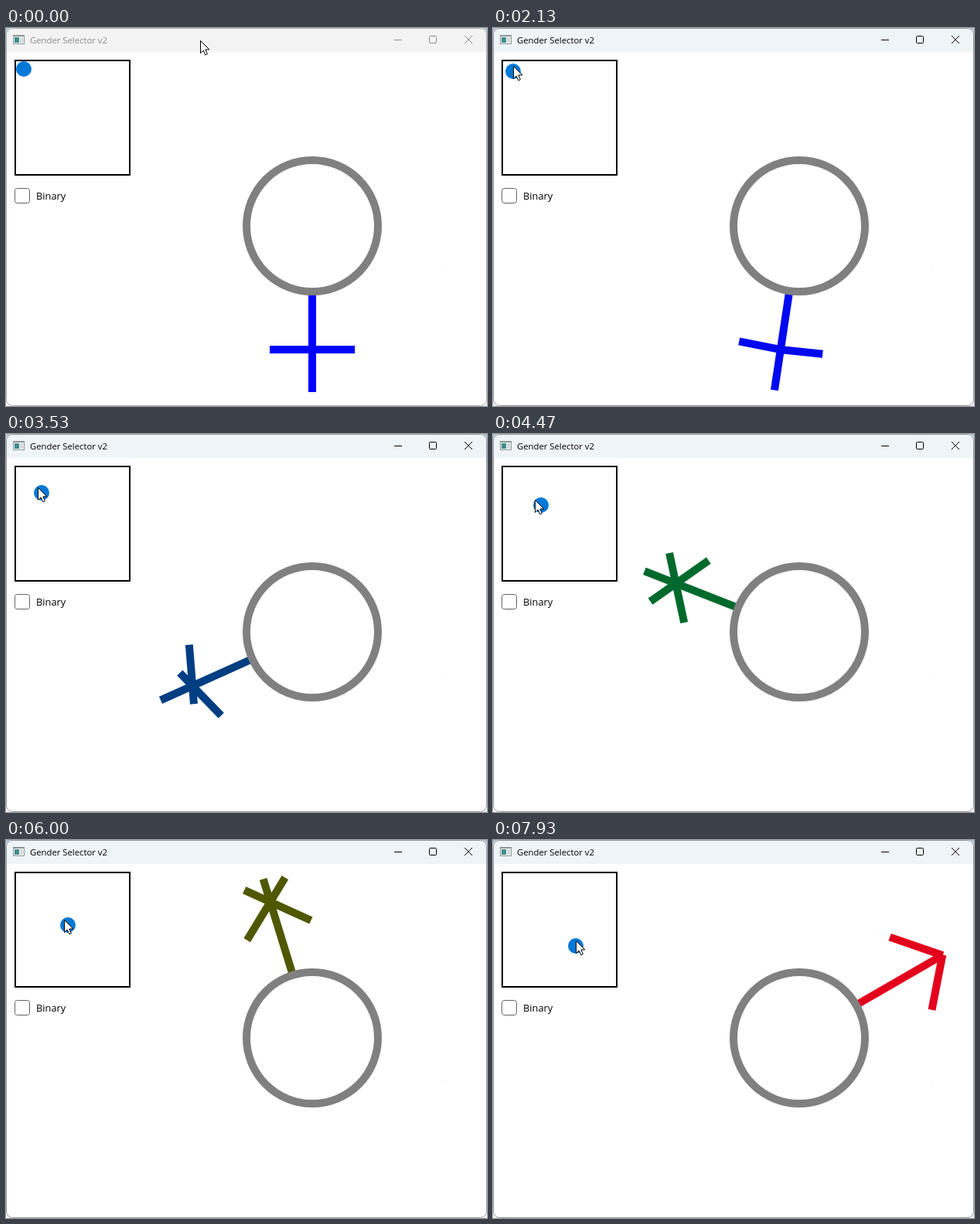
These frames come from a looping animation (622 by 489 pixels, 8 s). An HTML page with a canvas:

```html
<!DOCTYPE html>
<html lang="en">
<head>
<meta charset="utf-8">
<title>Gender Selector v2</title>
<style>
  html, body { margin: 0; width: 100%; height: 100%; overflow: hidden; background: #fff; }
  canvas { display: block; }
</style>
</head>
<body>
<canvas id="stage" width="622" height="489"></canvas>
<script>
const ctx = document.getElementById('stage').getContext('2d');
const LOOP = 8000, FRAME = 1000 / 15, ACTIVE_AT = 2000;
const RANGE = 126;            // travel of the thumb
const CX = 396, CY = 256;     // ring centre

// time -> thumb offset along the diagonal
const drag = [
  [1930, 0], [2800, 12], [3200, 20], [3330, 20], [3930, 29], [4530, 40], [5270, 48],
  [5400, 48], [6000, 57], [6330, 64], [6800, 66], [7130, 69], [7930, 84]
];
// fraction of travel -> arm: middle along and across the stem, length, tilt in degrees
const arms = [
  [0, 160, 27.5, 55, 0], [3 / 8, 170, 0, 100, 40.5],
  [5 / 8, 193, 25.3, 83, 44], [2 / 3, 190.4, 27, 72.5, 41]
];
// fraction of travel -> colour
const hues = [[0, 0, 0, 255], [3 / 8, 0, 128, 0], [5 / 8, 255, 0, 0], [1, 0, 0, 255]];

const clamp = x => Math.max(0, Math.min(1, x));
const smooth = x => x * x * (3 - 2 * x);
const mix = (a, b, k) => a + (b - a) * k;

// Linear interpolation between key points
function sample(keys, x) {
  let i = 1;
  while (i < keys.length - 1 && x > keys[i][0]) i++;
  const a = keys[i - 1], b = keys[i];
  const k = clamp((x - a[0]) / (b[0] - a[0]));
  return a.slice(1).map((v, j) => mix(v, b[j + 1], k));
}

function bezier(a, b, c, d, t) {
  const s = 1 - t;
  return s * s * s * a + 3 * s * s * t * b + 3 * s * t * t * c + t * t * t * d;
}

// Sweep down, approach the thumb, then hold it
function pointer(t, d) {
  if (t >= ACTIVE_AT - 1) {
    const drift = Math.sin(Math.PI * clamp((t - ACTIVE_AT) / 5500));
    return [23 + d - 8 * drift * drift, 46 + d];
  }
  if (t > 1130) {
    const k = smooth(clamp((t - 1130) / 470));
    return [mix(47, 25, k), mix(70, 46, k)];
  }
  const k = smooth(clamp((t - 270) / 860));
  return [bezier(251, 210, 85, 47, k), bezier(16, 200, 230, 70, k)];
}

function rect(x, y, w, h, color) {
  ctx.fillStyle = color;
  ctx.fillRect(x, y, w, h);
}

function line(x1, y1, x2, y2) {
  ctx.beginPath();
  ctx.moveTo(x1, y1);
  ctx.lineTo(x2, y2);
  ctx.stroke();
}

function box(x, y, w, h, r) {
  ctx.beginPath();
  ctx.roundRect(x, y, w, h, r);
}

function disc(x, y, r) {
  ctx.beginPath();
  ctx.arc(x, y, r, 0, 2 * Math.PI);
}

function text(s, x, y, size, color) {
  ctx.font = size + 'px "Open Sans", "Noto Sans", sans-serif';
  ctx.fillStyle = color;
  ctx.fillText(s, x, y);
}

function drawWindow(active) {
  const sky = ctx.createLinearGradient(0, 0, 0, 489);
  sky.addColorStop(0, '#a9c0d0');
  sky.addColorStop(.2, '#e4eaee');
  sky.addColorStop(1, '#f4f4f4');
  rect(0, 0, 622, 489, sky);

  ctx.save();
  box(0, 0, 622, 489, 8);
  ctx.clip();
  rect(0, 0, 622, 489, '#fff');
  rect(0, 0, 622, 31, active ? '#eff4f9' : '#f3f3f3');
  ctx.restore();
  ctx.lineWidth = 1;
  ctx.strokeStyle = active ? '#8f969c' : '#a6abb0';
  box(.5, .5, 621, 488, 8);
  ctx.stroke();

  // title icon
  rect(9, 9, 15, 12, '#8d9599');
  rect(10, 11, 13, 9, '#f4f6f6');
  rect(11, 12, 6, 7, '#3f8f8c');
  rect(18, 12, 4, 7, '#d3dadb');

  const ink = active ? '#000' : '#8a8a8a';
  text('Gender Selector v2', 31, 20, 11.3, ink);
  ctx.strokeStyle = ink;
  line(502, 15.5, 512, 15.5);
  box(547.5, 10.5, 9, 9, 1);
  ctx.stroke();
  line(593, 10, 603, 20);
  line(603, 10, 593, 20);
}

function drawControls(d) {
  ctx.strokeStyle = '#000';
  ctx.lineWidth = 2;
  ctx.strokeRect(12, 42, 148, 148);

  disc(23 + d, 53 + d, 10);
  ctx.fillStyle = '#0078d7';
  ctx.fill();

  ctx.strokeStyle = '#626262';
  ctx.lineWidth = 1;
  box(11.5, 207.5, 19, 19, 3);
  ctx.stroke();
  text('Binary', 39, 222, 12.8, '#000');
  rect(567, 311, 1, 1, '#e2e2e2');
}

function drawSymbol(f) {
  const [along, across, length, tilt] = sample(arms, f);
  const angle = tilt * Math.PI / 180;
  const dx = length / 2 * Math.cos(angle), dy = length / 2 * Math.sin(angle);
  ctx.save();
  ctx.translate(CX, CY);
  ctx.rotate(f * 2 * Math.PI);
  ctx.lineWidth = 10;
  ctx.strokeStyle = `rgb(${sample(hues, f).map(Math.round)})`;
  line(0, 85, 0, 215);
  for (const side of [-1, 1]) {
    line(side * (across + dx), along - dy, side * (across - dx), along + dy);
  }
  ctx.restore();

  ctx.lineWidth = 10;
  ctx.strokeStyle = '#808080';
  disc(CX, CY, 85);
  ctx.stroke();
}

function drawPointer(x, y) {
  ctx.save();
  ctx.translate(Math.round(x) + .5, Math.round(y) + .5);
  ctx.beginPath();
  [[0, 0], [0, 16], [3.7, 12.6], [6.3, 18.3], [8.9, 17.2], [6.4, 11.5], [11.4, 11.4]]
    .forEach(p => ctx.lineTo(...p));
  ctx.closePath();
  ctx.fillStyle = '#fff';
  ctx.fill();
  ctx.strokeStyle = '#000';
  ctx.lineWidth = 1;
  ctx.stroke();
  ctx.restore();
}

function draw(ms) {
  const t = Math.floor((ms % LOOP + 4) / FRAME) * FRAME;
  const d = Math.round(sample(drag, t)[0]);
  drawWindow(t >= ACTIVE_AT - 1);
  drawControls(d);
  drawSymbol(d / RANGE);
  drawPointer(...pointer(t, d));
}

const start = performance.now();
function tick() {
  draw(performance.now() - start);
  requestAnimationFrame(tick);
}
tick();
</script>
</body>
</html>
```
